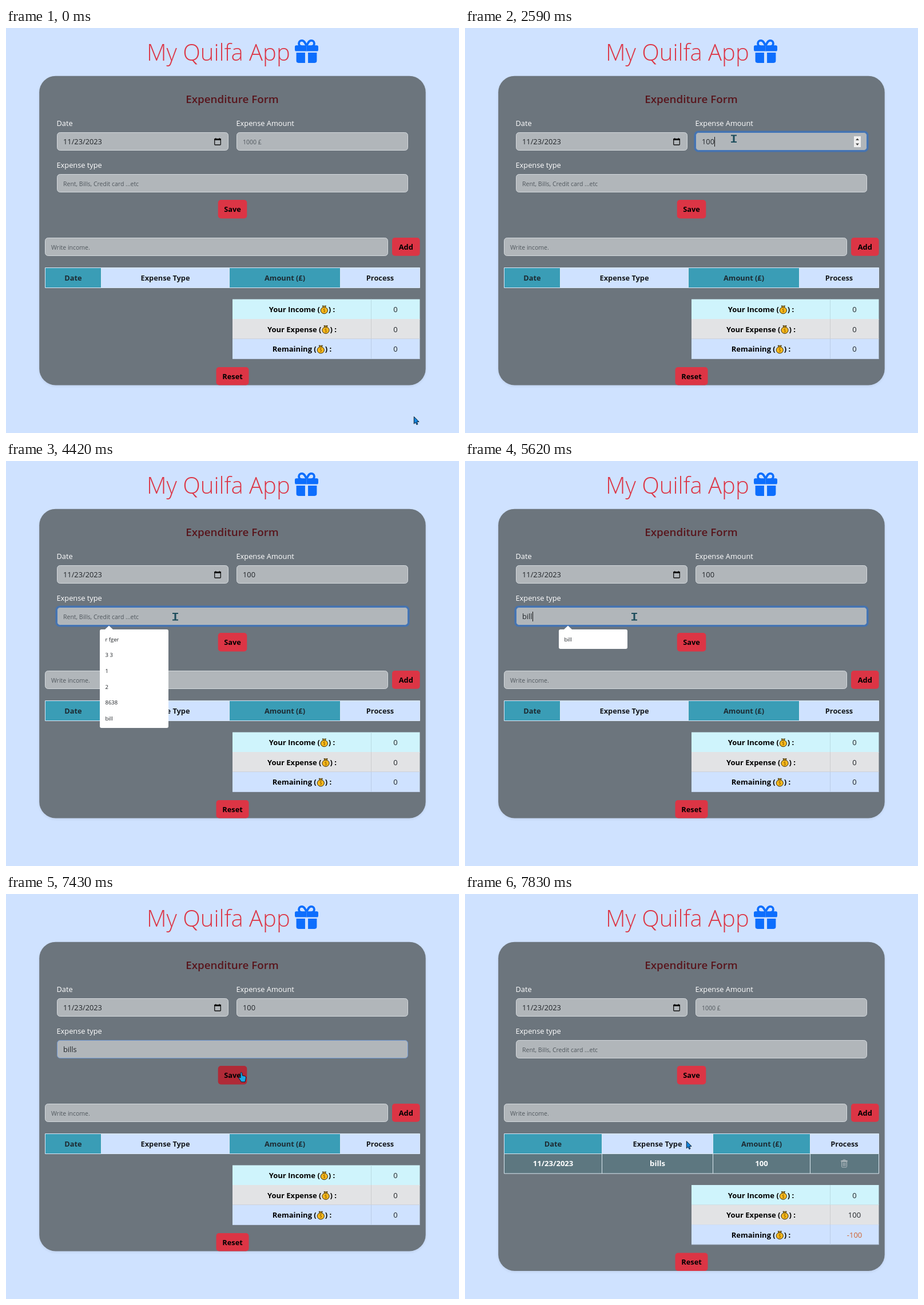
Write an HTML page with a canvas that moves like this. It is 792 by 707 pixels and loops after 8 s.

```html
<!DOCTYPE html>
<html lang="en">
<head>
<meta charset="utf-8">
<title>Expenditure Form</title>
<style>
html, body { margin: 0; width: 100%; height: 100%; overflow: hidden; background: #cfe2ff; }
canvas { display: block; }
</style>
</head>
<body>
<canvas id="stage" width="792" height="707"></canvas>
<script>
const ctx = document.getElementById('stage').getContext('2d');
const LOOP = 8000;
const FAMILY = '"Open Sans", "Noto Sans", sans-serif';
const BLUE = '#cfe2ff', TEAL = '#3a9db6', RED = '#dc3545', INK = '#212529';

// Pointer stops: [start ms, x, y, shape]
const POINTER = [
  [0, 713, 678, 'arrow'], [200, 690, 600, 'arrow'], [400, 560, 380, 'arrow'],
  [590, 400, 160, 'arrow'], [790, 362, 160, 'arrow'], [990, 445, 193, 'beam'],
  [1190, 470, 193, 'beam'], [2990, 440, 208, 'beam'], [3190, 370, 236, 'arrow'],
  [3400, 305, 268, 'beam'], [3610, 296, 271.5, 'beam'], [6820, 322, 280, 'beam'],
  [7020, 380, 300, 'arrow'], [7220, 411, 311, 'hand'],
  [7630, 400, 370, 'arrow'], [7830, 387, 431, 'arrow']
];
const AMOUNT = [[0, ''], [1990, '1'], [2190, '10'], [2590, '100'], [7630, '']];
const TYPE = [[0, ''], [4620, 'b'], [5020, 'bi'], [5620, 'bill'], [5820, 'bills'], [7630, '']];

const at = (track, t) => track.filter(k => k[0] <= t).pop();
const within = (t, from, to) => t >= from && t < to;

function text(str, x, y, { size = 12.8, weight = 400, color = INK, align = 'left' } = {}) {
  ctx.font = `${weight} ${size}px ${FAMILY}`;
  ctx.fillStyle = color;
  ctx.textAlign = align;
  ctx.fillText(str, x, y);
  return ctx.measureText(str).width;
}

function box(x, y, w, h, r, fill, stroke, line = 1) {
  ctx.beginPath();
  ctx.roundRect(x, y, w, h, r);
  if (fill) { ctx.fillStyle = fill; ctx.fill(); }
  if (stroke) { ctx.strokeStyle = stroke; ctx.lineWidth = line; ctx.stroke(); }
}

function shape(points, fill, stroke) {
  ctx.beginPath();
  points.forEach(([x, y]) => ctx.lineTo(x, y));
  ctx.closePath();
  if (fill) { ctx.fillStyle = fill; ctx.fill(); }
  if (stroke) { ctx.strokeStyle = stroke; ctx.lineWidth = 1; ctx.stroke(); }
}

function placed(x, y, draw, scale = 1) {
  ctx.save();
  ctx.translate(x, y);
  ctx.scale(scale, scale);
  draw();
  ctx.restore();
}

// Drawn in a 16-unit square: one half, mirrored for the other.
function giftHalf() {
  ctx.strokeStyle = '#0d6efd';
  ctx.lineWidth = 1.5;
  ctx.beginPath();
  ctx.moveTo(8, 4.1);
  ctx.lineTo(6.6, 1.8);
  ctx.quadraticCurveTo(5.9, 0.75, 4.75, 0.75);
  ctx.arc(4.75, 2.75, 2, -Math.PI / 2, Math.PI / 2, true);
  ctx.stroke();
  box(0, 4, 8.02, 4, [1, 0, 0, 1], '#0d6efd');
  box(1, 9, 6, 7, [0, 0, 0, 1.5], '#0d6efd');
}

function gift() {
  giftHalf();
  ctx.translate(16, 0);
  ctx.scale(-1, 1);
  giftHalf();
}

function moneyBag() {
  shape([[-2, -4], [-3.2, -7], [0, -6.4], [3.2, -7], [2, -4]], '#f9bf2c', '#2b2005');
  ctx.beginPath();
  ctx.ellipse(0, 1.6, 6.4, 6, 0, 0, Math.PI * 2);
  ctx.fillStyle = '#fbba1c';
  ctx.strokeStyle = '#2b2005';
  ctx.fill();
  ctx.stroke();
  text('$', 0, 4.8, { size: 8.5, color: '#8a5d00', align: 'center' });
}

function trash() {
  box(-4.5, -3.5, 9, 10, [0, 0, 1.5, 1.5], null, '#b4bcc0');
  box(-5.5, -5, 11, 1.6, 0.5, null, '#b4bcc0');
  box(-2, -6.5, 4, 1.5, 0.5, null, '#b4bcc0');
  ctx.fillStyle = '#b4bcc0';
  for (const x of [-2.5, -0.5, 1.5]) ctx.fillRect(x, -1.5, 1, 6);
}

function calendar() {
  box(364.7, 194, 10.6, 10, 1, null, '#111', 1.3);
  ctx.fillStyle = '#111';
  ctx.fillRect(364, 193, 12, 3);
  ctx.fillRect(366, 192, 1.4, 2);
  ctx.fillRect(372.6, 192, 1.4, 2);
}

const pointers = {
  arrow() {
    shape([[0.3, 0.5], [0.3, 13], [3, 10.4], [5, 14.5], [7, 13.5], [5.2, 9.6], [9, 9.4]],
      '#1286e0', '#0a1a2c');
  },
  beam() {
    ctx.fillStyle = '#1d4d5c';
    ctx.fillRect(-1.5, -6, 3, 12.5);
    ctx.fillRect(-5, -6.5, 10, 2);
    ctx.fillRect(-5, 5, 10, 2);
  },
  hand() {
    ctx.beginPath();
    ctx.moveTo(-1, 1.5);
    ctx.quadraticCurveTo(0.2, -0.8, 1.8, 1.5);
    ctx.lineTo(2.3, 6);
    ctx.lineTo(7, 7);
    ctx.quadraticCurveTo(9, 7.5, 8.5, 10);
    ctx.lineTo(7, 17);
    ctx.lineTo(0.5, 17);
    ctx.lineTo(-4, 10.5);
    ctx.quadraticCurveTo(-4, 8, -1, 10);
    ctx.closePath();
    ctx.fillStyle = '#18a9e6';
    ctx.strokeStyle = '#0a1a2c';
    ctx.lineWidth = 1;
    ctx.fill();
    ctx.stroke();
  }
};

function field(x, y, w, h, value, hint, { focused = false, border = '#d3d8dc' } = {}) {
  if (focused) box(x - 1, y - 1, w + 2, h + 2, 6, null, '#4573b0', 3.2);
  box(x + 0.5, y + 0.5, w - 1, h - 1, 5, '#b1b6ba', focused ? '#4377bb' : border);
  const base = y + h / 2 + 4.8;
  if (value) return text(value, x + 11, base);
  text(hint, x + 11, base, { size: 10.5, color: '#50575d' });
  return 0;
}

function caret(x, y) {
  ctx.fillStyle = '#111';
  ctx.fillRect(Math.round(x), y, 1, 17);
}

function spinner() {
  box(680, 189, 12, 19, 0, '#efefef');
  shape([[683, 196], [689, 196], [686, 192.5]], '#444');
  shape([[683, 201.5], [689, 201.5], [686, 205]], '#444');
}

function button(label, x, y, w, h, fill = RED) {
  box(x, y, w, h, 5, fill);
  text(label, x + w / 2, y + h / 2 + 4.8, { weight: 700, color: '#000', align: 'center' });
}

function expenseTable(saved) {
  const edges = saved ? [68, 239, 433, 603, 723] : [68, 166, 390, 584, 723];
  const titles = ['Date', 'Expense Type', 'Amount (£)', 'Process'];
  const entry = ['11/23/2023', 'bills', '100'];
  titles.forEach((title, i) => {
    const x = edges[i] + 0.5, w = edges[i + 1] - edges[i], mid = x + w / 2;
    box(x, 418.5, w, 35, 0, i % 2 ? BLUE : TEAL, '#dbe8f8');
    text(title, mid, 440.5, { weight: 700, color: i % 2 ? '#15191d' : '#1d2a32', align: 'center' });
    if (!saved) return;
    box(x, 453.5, w, 34.5, 0, '#5d7780', '#dbe8f0');
    if (entry[i]) text(entry[i], mid, 475, { size: 13.1, weight: 700, color: '#fff', align: 'center' });
    else placed(mid - 0.5, 470.5, trash);
  });
}

function totals(saved, top) {
  const rows = [
    ['Your Income (', '0', '#cff4fc', '#badce3'],
    ['Your Expense (', saved ? '100' : '0', '#e2e3e5', '#cbccce'],
    ['Remaining (', saved ? '-100' : '0', BLUE, '#bacbe6']
  ];
  const bold = { size: 13, weight: 700, color: '#000' };
  rows.forEach(([label, value, fill, line], i) => {
    const y = top + i * 34.6, base = y + 22.7;
    box(396, y, 327.5, 35, 0, fill);
    ctx.fillStyle = line;
    ctx.fillRect(396, Math.round(y + 34), 327.5, 1);
    ctx.fillRect(638, y, 1, 35);
    ctx.font = `700 13px ${FAMILY}`;
    const before = ctx.measureText(label).width, after = ctx.measureText(') :').width;
    const x = 517.5 - (before + 15 + after) / 2;
    text(label, x, base, bold);
    placed(x + before + 7.5, y + 18, moneyBag, 0.95);
    text(') :', x + before + 15, base, bold);
    text(value, 681, base, { size: 13, color: value[0] === '-' ? '#d0602c' : INK, align: 'center' });
  });
}

function suggestions(items) {
  const h = items.length * 27.6 + 6.4;
  shape([[172.5, 294.5], [180, 287.5], [187.5, 294.5]], '#fff');
  box(164, 294, 120, h, 3, '#fff');
  items.forEach((item, i) => text(item, 173.5, 314.8 + i * 27.6, { size: 9.5 }));
}

function draw(t) {
  const saved = t >= 7630, shift = saved ? 34.5 : 0;
  const amountFocus = within(t, 1190, 3810), typeFocus = within(t, 3810, 7430);
  const pressed = within(t, 7430, 7630);

  ctx.fillStyle = BLUE;
  ctx.fillRect(0, 0, 792, 707);
  text('My Quilfa App', 246, 56.5, { size: 40, weight: 300, color: RED });
  placed(505, 20, gift, 2.56);

  ctx.save();
  ctx.shadowColor = 'rgba(0,0,0,.08)';
  ctx.shadowBlur = 4;
  ctx.shadowOffsetY = 1.8;
  box(58.2, 83.7, 675.5, 539.7 + shift, 28.5, '#6c757d');
  ctx.restore();

  text('Expenditure Form', 395.5, 130.5, { size: 18.8, weight: 600, color: '#58151c', align: 'center' });
  text('Date', 88.5, 170.5, { color: '#fff' });
  text('Expense Amount', 402.5, 170.5, { color: '#fff' });
  text('Expense type', 88.5, 243.5, { color: '#fff' });

  field(89, 182, 300, 32, '11/23/2023', '');
  calendar();
  const amountWidth = field(403, 182, 300, 32, at(AMOUNT, t)[1], '1000 £', { focused: amountFocus });
  if (amountFocus) {
    spinner();
    caret(414 + amountWidth, 190);
  }
  const typeWidth = field(89, 255, 614, 32, at(TYPE, t)[1], 'Rent, Bills, Credit card ...etc',
    { focused: typeFocus, border: pressed ? '#6f97d0' : undefined });
  if (typeFocus && !within(t, 4420, 4620) && !within(t, 6420, 6820)) caret(100 + typeWidth, 263);

  const saveFill = pressed ? '#b02a37' : within(t, 7220, 7430) ? '#bb2d3b' : RED;
  button('Save', 370.7, 300, 50.6, 32.5, saveFill);
  field(68, 366, 600, 32, '', 'Write income.');
  button('Add', 675, 366, 48.6, 31.8);

  expenseTable(saved);
  totals(saved, saved ? 508 : 473.5);
  button('Reset', 367.5, 592 + shift, 57, 31.5);

  if (within(t, 4010, 4620)) suggestions(['r fger', '3 3', '1', '2', '8638', 'bill']);
  else if (within(t, 4620, 5820)) suggestions(['bill']);

  const [, x, y, kind] = at(POINTER, t);
  placed(x, y, pointers[kind]);
}

function tick() {
  draw(performance.now() % LOOP);
  requestAnimationFrame(tick);
}
tick();
</script>
</body>
</html>
```
